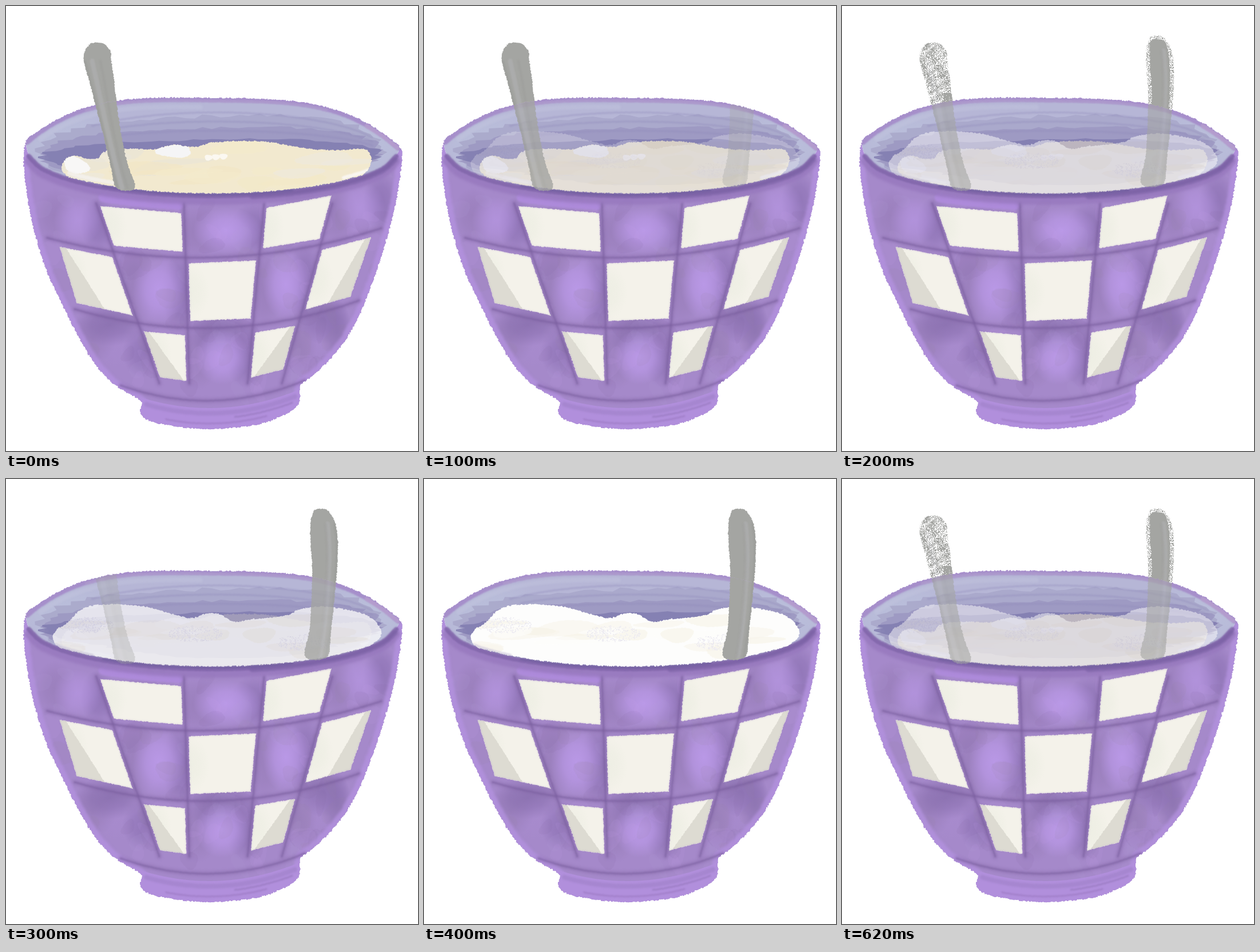
An HTML page with a canvas that plays this animation: 720 by 778 pixels, repeating every 0.7 s.

```html
<!DOCTYPE html>
<html lang="en">
<head>
<meta charset="utf-8">
<title>Breakfast bowl</title>
<style>
html, body { margin: 0; width: 100%; height: 100%; overflow: hidden; background: #fff; }
canvas { display: block; width: 720px; height: 778px; }
</style>
</head>
<body>
<canvas id="stage" width="720" height="778"></canvas>
<script>
const W = 720, H = 778;
let seed = 41;
function rnd() {
  seed = (seed + 0x6D2B79F5) | 0;
  let t = Math.imul(seed ^ (seed >>> 15), 1 | seed);
  t = (t + Math.imul(t ^ (t >>> 7), 61 | t)) ^ t;
  return ((t ^ (t >>> 14)) >>> 0) / 4294967296;
}
const spread = n => (rnd() - 0.5) * 2 * n;
const mix = (a, b, t) => a.map((v, i) => v + (b[i] - v) * t);
const points = text => text.split(' ').map(s => s.split(',').map(Number));

function layer(paint) {
  const cv = document.createElement('canvas');
  cv.width = W; cv.height = H;
  paint(cv.getContext('2d'));
  return cv;
}

// Smooth path through points; bend 0 gives straight sides, rough frays the edge.
function trace(p, { closed = true, rough = 0, bend = 0.5 } = {}) {
  const n = p.length, path = new Path2D();
  const at = i => closed ? p[(i + n) % n] : p[Math.max(0, Math.min(n - 1, i))];
  for (let i = 0; i < (closed ? n : n - 1); i++) {
    const a = at(i - 1), b = at(i), c = at(i + 1), d = at(i + 2);
    const count = Math.max(2, Math.ceil(Math.hypot(c[0] - b[0], c[1] - b[1]) / 1.5));
    for (let k = 0; k < count; k++) {
      const t = k / count, t2 = t * t, t3 = t2 * t;
      const [x, y] = bend ? [0, 1].map(j =>
        (2 * t3 - 3 * t2 + 1) * b[j] + (t3 - 2 * t2 + t) * (c[j] - a[j]) * bend
        + (3 * t2 - 2 * t3) * c[j] + (t3 - t2) * (d[j] - b[j]) * bend) : mix(b, c, t);
      path.lineTo(x + spread(rough), y + spread(rough));
    }
  }
  if (closed) path.closePath(); else path.lineTo(...p[n - 1]);
  return path;
}
function arc(f, x0, x1) {
  const n = Math.max(2, Math.round(Math.abs(x1 - x0) / 18));
  return Array.from({ length: n + 1 }, (_, i) => {
    const x = x0 + (x1 - x0) * i / n;
    return [x, f(x)];
  });
}

function fill(g, path, color, alpha = 1) {
  g.globalAlpha = alpha;
  g.fillStyle = color;
  g.fill(path);
  g.globalAlpha = 1;
}
function stroke(g, line, color, width, alpha = 1, blur = 0.8) {
  g.save();
  g.globalAlpha = alpha;
  g.filter = blur ? `blur(${blur}px)` : 'none';
  g.strokeStyle = color;
  g.lineWidth = width;
  g.lineCap = g.lineJoin = 'round';
  g.stroke(line instanceof Path2D ? line : trace(line, { closed: false, rough: 0.4 }));
  g.restore();
}
function glow(g, [x, y], rx, ry, color, alpha = 1) {
  g.save();
  g.translate(x, y);
  g.scale(rx, ry);
  const grad = g.createRadialGradient(0, 0, 0, 0, 0, 1);
  grad.addColorStop(0, color);
  grad.addColorStop(0.5, color + 'b0');
  grad.addColorStop(1, color + '00');
  g.globalAlpha = alpha;
  g.fillStyle = grad;
  g.fillRect(-1, -1, 2, 2);
  g.restore();
}
function dab(g, x, y, rx, ry, color, alpha = 1, turn = 0) {
  const path = new Path2D(), c = Math.cos(turn), s = Math.sin(turn);
  for (let a = 0; a < 6.28; a += 0.06) {
    const r = 1 + spread(0.04) + 0.1 * Math.sin(a * 3 + x);
    const u = Math.cos(a) * rx * r, v = Math.sin(a) * ry * r;
    path.lineTo(x + u * c - v * s, y + u * s + v * c);
  }
  fill(g, path, color, alpha);
}

// Bowl geometry: back rim, front lip and checked grid
const rim = x => 161 + 80 * Math.abs((x - 360) / 326) ** 3.6 + (x - 360) * 0.012;
const lip = x => 252 + 78 * Math.sqrt(Math.max(0, 1 - ((x - 361) / 323) ** 2));
const back = arc(rim, 36, 687);
const inside = trace([...back, ...arc(lip, 682, 40)]);
const body = trace([...back, ...points('692,264 683,335 667,400 652,450 634,500 610,556 577,605 543,640 515,663 '
  + '514,685 505,703 472,721 425,734 350,739 290,734 246,723 235,708 235,690 190,662 155,625 125,575 100,525 '
  + '78,480 63,440 51,400 42,360 35,315 31,268')], { rough: 1.3 });

const rows = [[362, 320, 0.0005], [440, 335, 0.0005], [563, 345, 0.00065], [690, 350, 0.0012]]
  .map(([low, mid, bow]) => x => low - bow * (x - mid) ** 2);
const cols = [[66, 0.304], [158, 0.35], [311, 0.03], [451, -0.092], [570, -0.28], [663, -0.345]]
  .map(([x, lean]) => y => x + lean * (y - 346));
function cross(c, r, dx, dy) {
  let x = cols[c](346), y = 0;
  for (let i = 0; i < 4; i++) {
    y = rows[r](x) + dy;
    x = cols[c](y) + dx;
  }
  return [x, y];
}
const cells = [];
for (let r = 0; r < 3; r++) {
  for (let c = 0; c < 5; c++) {
    const top = [0, 10, 13][r], low = [-10, -12, -33][r];
    const box = [cross(c, r, 5, top), cross(c + 1, r, -5, top), cross(c + 1, r + 1, -5, low), cross(c, r + 1, 5, low)];
    cells.push({ r, c, box, white: (r + c) % 2 === 1 });
  }
}

function paintWall(g) {
  g.save();
  g.clip(inside);
  fill(g, inside, '#b6b6d6');
  [110, 630].forEach(x => glow(g, [x, 235], 105, 68, '#babfdb', 0.9));
  ['#a8a7ca', '#9c97c1', '#807bb0'].forEach((color, i) => {
    dab(g, 368, 270, 290 - i * 3, 86 - i * 23, color, 0.8);
    stroke(g, arc(x => 262 - (76 - i * 16) * Math.sqrt(1 - ((x - 368) / 300) ** 2), 150 + i * 20, 640), '#8f8bb9', 3, 0.35);
  });
  stroke(g, arc(x => rim(x) + 16, 60, 340), '#c2c6df', 8, 0.4, 1.5);
  g.restore();
}

function paintFoot(g) {
  const level = d => x => 703 + d - 0.0013 * (x - 355) ** 2;
  fill(g, trace([...arc(level(0), 233, 517), [517, 745], [233, 745]], { bend: 0 }), '#b18fdc');
  stroke(g, arc(level(9), 245, 505), '#9a7cc1', 8, 0.45, 1.5);
  stroke(g, arc(level(27), 280, 455), '#9877bd', 3, 0.5);
  stroke(g, arc(level(18), 400, 500), '#8d70b1', 3, 0.45);
}

function paintTile(g, { r, c, box }) {
  const tile = trace(box, { bend: 0, rough: 0.7 });
  fill(g, tile, '#f4f2ea');
  g.save();
  g.clip(tile);
  glow(g, mix(box[0], box[3], 0.5), 35, 50, '#eaece0', 0.6);
  if (r && c !== 2) {
    const [outTop, inTop, inLow, outLow] = c < 2 ? box : [box[1], box[0], box[3], box[2]];
    const edge = [mix(outTop, inTop, 0.12), mix(outLow, inLow, r === 2 ? 0.9 : 0.5)];
    fill(g, trace([outTop, edge[0], edge[1], outLow], { bend: 0, rough: 0.6 }), '#dddbd2');
  }
  g.restore();
  stroke(g, tile, '#a991c5', 1.5, 0.3);
}

function paintFront(g) {
  g.save();
  fill(g, body, '#a589ca');
  g.clip(body);
  for (const { r, c, box, white } of cells) {
    if (white) continue;
    const [left, right] = [mix(box[0], box[3], 0.5), mix(box[1], box[2], 0.5)];
    const w = right[0] - left[0], h = box[3][1] - box[0][1];
    glow(g, mix(left, right, 0.1), w * 0.4, h * 0.7, '#9b80bd');
    glow(g, mix(left, right, 0.95), w * 0.35, h * 0.7, '#8f74b6', 0.9);
    if (r === 2) glow(g, mix(box[0], box[1], 0.5), w * 0.6, h * 0.6, '#8b71b0', 0.9);
    glow(g, mix(left, right, 0.55), w * 0.48, h * 0.6, '#b998e6', c % 4 ? 1 : 0.6 - r * 0.25);
  }
  const paints = ['#7e659f', '#c29be9', '#ad9bd4', '#96839f'];
  for (let i = 0; i < 120; i++) {
    dab(g, 40 + rnd() * 640, 335 + rnd() * 350, 8 + rnd() * 20, 7 + rnd() * 18, paints[i % 4], 0.1, rnd() * 3);
  }
  stroke(g, body, '#b391df', 18, 0.8, 2);
  paintFoot(g);

  stroke(g, arc(x => lip(x) + 20, 170, 302), '#ae8bdc', 16, 0.9, 1.5);
  const ends = [[72, 656], [120, 617], [200, 522]];
  const lines = [
    ...ends.map(([a, b], i) => arc(rows[i + 1], a, b)),
    ...[1, 2, 3, 4].map(c => [345, 400, 460, 520, 580, 660].map(y => [cols[c](y), y]))
  ];
  lines.forEach(l => {
    stroke(g, l, '#8063a3', 9, 0.3, 2);
    stroke(g, l, '#785f9e', 3, 0.5, 1);
  });
  cells.filter(t => t.white).forEach(t => paintTile(g, t));
  g.globalCompositeOperation = 'destination-out';
  g.fill(inside);
  g.restore();
}

function paintRim(g) {
  g.save();
  g.clip(body);
  stroke(g, back, '#a58bc9', 14, 0.9, 1);
  stroke(g, arc(x => rim(x) + 5, 140, 560), '#b1a0cd', 4, 0.6);
  stroke(g, arc(x => rim(x) + 5, 630, 684), '#b9a2cf', 7, 0.7);
  stroke(g, arc(x => lip(x) + 10, 40, 682), '#9677bd', 15, 0.75, 2);
  stroke(g, arc(x => lip(x) + 2, 40, 682), '#8166aa', 8, 0.85, 1);
  stroke(g, arc(x => lip(x) + 5, 430, 680), '#7a61a3', 9, 0.6, 1.5);
  stroke(g, arc(lip, 170, 500), '#715f9f', 4, 0.7);
  g.restore();
}

const bowl = layer(g => [paintWall, paintFront, paintRim].forEach(p => g.drawImage(layer(p), 0, 0)));

// Food sits on the lip: a drawn top edge, then the lip curve back to its start.
function food(top, [from, to], color, patches, extra) {
  return layer(g => {
    const shape = trace([...points(top), ...arc(x => lip(x) - 2.5, to, from)], { rough: 1.2 });
    fill(g, shape, color);
    g.save();
    g.clip(shape);
    for (let i = 0; i < 24; i++) {
      dab(g, from + (to - from) * ((i * 0.382) % 1), 245 + rnd() * 65, 25 + rnd() * 40, 5 + rnd() * 9,
        patches[i % patches.length], 0.6, -0.05);
    }
    extra(g);
    g.restore();
  });
}

const oats = food('97,283 104,268 122,262 145,268 162,266 170,256 200,250 258,250 290,243 330,246 360,239 410,236 '
  + '460,238 500,245 535,250 580,252 625,250 638,264 635,282', [107, 622], '#f2e9cf',
  ['#f4e9c8', '#e9e4d9', '#f5ebcb', '#eeeae0', '#f3e7c5'], g => {
    dab(g, 122, 278, 24, 14, '#f8f7f6', 1, 0.4);
    stroke(g, arc(x => lip(x) - 9, 110, 190), '#f4f2ef', 7, 0.8);
    stroke(g, arc(x => lip(x) - 7, 590, 634), '#faf8f4', 6, 0.9);
    dab(g, 294, 254, 31, 11, '#f5f5f6');
    for (let i = 0; i < 3; i++) dab(g, 354 + i * 13, 265 - i, 7, 5, '#fbf8f1');
  });

const cream = food('82,278 88,264 108,251 130,229 160,220 210,220 248,224 290,236 325,243 348,236 374,236 398,250 '
  + '430,245 488,239 512,228 550,223 592,228 632,239 653,258 655,274', [90, 642], '#fdfdfc',
  ['#f9f6ed', '#fdfdfc', '#f7f3e8'], g => {
    for (let i = 0; i < 900; i++) {
      const a = rnd() * 6.28, r = Math.sqrt(rnd()), side = i % 3;
      g.fillStyle = i % 2 ? '#e8e6ef' : '#f1f0f4';
      g.fillRect(140 + side * 190 + Math.cos(a) * r * 48, 255 + side * 15 + Math.sin(a) * r * 14, 1.5, 1.5);
    }
    stroke(g, arc(x => lip(x) - 1, 86, 150), '#d0cbdc', 9, 0.7, 1);
  });

// A spoon is a spine of [x, y, half width].
const side = (spine, f) => spine.map(([x, y, w]) => [x + w * f, y]);
const limb = (spine, f = 1) => trace([...side(spine, -f), ...side(spine, f).reverse()], { rough: 0.9 });
function spoon(spine, shine) {
  return layer(g => {
    const shape = limb(spine), run = spine.slice(2);
    fill(g, shape, '#a4a5a2');
    g.save();
    g.clip(shape);
    stroke(g, side(run, shine), '#b1b1b3', 8, 0.6, 1.2);
    stroke(g, side(run, 0.2), '#9b9c99', 4, 0.4, 1);
    stroke(g, side(run, shine < 0 ? -0.9 : 0.9), '#969794', 3, 0.5);
    g.restore();
  });
}
const spines = ['159,65,9 160,78,22 160,96,24 167,130,22 174,168,19 185,222,16 197,275,15 209,318,16',
  '550,53,8 551,60,15 554,78,22 556,110,24 557,150,22 554,210,20 549,265,19 542,311,19'].map(points);
const spoons = spines.map((s, i) => spoon(s, i ? 0.35 : -0.4));

const cut = (src, mode) => layer(g => {
  g.drawImage(src, 0, 0);
  g.globalCompositeOperation = mode;
  g.fill(body);
});
const handles = spoons.map(s => cut(s, 'destination-out'));
const stems = spoons.map(s => cut(s, 'destination-in'));

// Keeps single grains where keep(x, y) beats chance.
const grains = (src, x0, keep) => layer(g => {
  g.drawImage(src, 0, 0);
  for (let y = 45; y < 195; y++)
    for (let x = x0; x < x0 + 80; x++)
      if (rnd() > keep(x, y)) g.clearRect(x, y, 1, 1);
});
const dust = [
  grains(handles[0], 125, (x, y) => x > 177 && y > 151 ? 0.97
    : 0.55 + 0.25 * Math.sin(x * 0.23 + y * 0.12) * Math.sin(y * 0.25)),
  layer(g => {
    g.drawImage(grains(handles[1], 520, () => 0.45), 0, 0);
    g.clip(limb(spines[1].slice(1), 0.72));
    g.drawImage(handles[1], 0, 0);
  })
];

const ctx = document.getElementById('stage').getContext('2d');
function put(img, alpha = 1) {
  ctx.globalAlpha = alpha;
  ctx.drawImage(img, 0, 0);
}
// m runs from oats (0) to cream (1); handles above the rim switch hard, with grain halfway.
function show(m) {
  const share = [1 - m, m];
  ctx.clearRect(0, 0, W, H);
  put(bowl);
  [oats, cream].forEach((f, i) => put(f, share[i]));
  stems.forEach((s, i) => put(s, share[i] ** 0.8));
  share.forEach((v, i) => {
    if (v >= 0.5) put(v === 0.5 ? dust[i] : handles[i]);
  });
}

const mixes = [0, 0.25, 0.5, 0.75, 1, 0.5];
const start = performance.now();
let last = -1;
function tick() {
  const t = (performance.now() - start) % 700;
  const i = Math.min(5, Math.floor(t / 100));
  if (i !== last) show(mixes[last = i]);
  requestAnimationFrame(tick);
}
tick();
</script>
</body>
</html>
```
